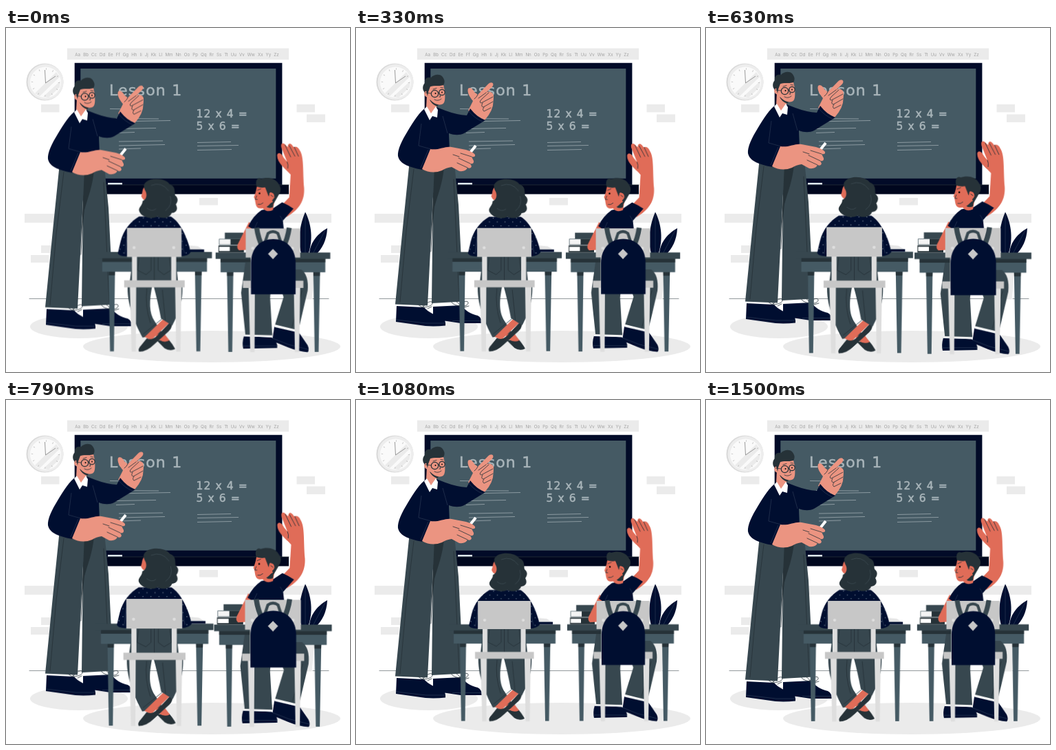
Recreate the animation shown at these times as an HTML page. Size 500x500 px, loop 1.54 s.

```html
<!DOCTYPE html>
<html lang="en">
<head>
<meta charset="utf-8">
<title>Classroom</title>
<style>
html, body { margin: 0; width: 100%; height: 100%; overflow: hidden; background: #fff; }
svg { display: block; width: 100vw; height: 100vh; }
text { font-family: "DejaVu Sans", sans-serif; fill: #a9b5ba; stroke: #a9b5ba; stroke-width: .5; }
.alphabet { font: 6.2px Inter, sans-serif; word-spacing: 2.3px; fill: #a3a3a3; stroke: none; }
.pale { fill: #ebebeb; }
.frame { fill: #020b28; }
.navy { fill: #000e30; }
.dark { fill: #263238; }
.cloth { fill: #37474f; }
.slate { fill: #455a64; }
.skin { fill: #eb9481; }
.tan { fill: #e06c58; }
.white { fill: #fff; }
.line { fill: none; stroke: #263238; stroke-width: .8; stroke-linecap: round; stroke-linejoin: round; }
.thin { stroke-width: .5; }
.bold { stroke-width: 1.2; }
.seam { fill: none; stroke: #33405c; stroke-width: .6; }
.chalk { fill: none; stroke: #93a1a7; stroke-width: .9; }

.teacher { animation: float 1540ms -42ms infinite linear; }
.pupil { animation: beat 1540ms -42ms infinite linear; }
#girl { transform-origin: 216px 345px; }
#boy { transform-origin: 388px 318.5px; }

@keyframes float {
  0%, 97.4%, 100% { transform: translateY(0); }
  48.7% { transform: translateY(-10px); }
}
@keyframes beat {
  0%, 29.2%, 39%, 60.9%, 100% { transform: scale(1); }
  9.74%, 48.7% { transform: scale(1.1); }
}
</style>
</head>
<body>
<svg viewBox="0 0 500 500">
  <defs>
    <pattern id="dots" width="11" height="11" patternUnits="userSpaceOnUse">
      <rect width="11" height="11" fill="#000e30"/>
      <circle cx="2" cy="3" r=".6" fill="#a9b5c0"/>
      <circle cx="7.500" cy="8.500" r=".6" fill="#a9b5c0"/>
    </pattern>
    <g id="desk">
      <path class="slate" d="M151 353h9l-1.500 113.500h-5.500zM273 353h9.500l-2 113.500h-5.500z"/>
      <path class="dark" d="M151 353h9l-.3 6h-8.600zM273 353h9.500l-.2 6h-9.200z"/>
      <path class="slate" d="M142 334h148v20H142z"/>
      <path class="dark" d="M142 334h148v6H142z"/>
      <path class="cloth" d="M135 326h162v9H135z"/>
    </g>
    <g id="chair">
      <path fill="#dedede" d="M184 332h7v36h-7zM239.500 332h7v36h-7zM181 375h9l-.5 92h-6zM245 375h9l-1.500 92h-6z"/>
      <path fill="#c7c7c7" d="M177 292h77v41h-77zM173 366h85.500v10H173z"/>
      <circle cx="187" cy="320" r="2.200" fill="#dedede"/>
      <circle cx="243" cy="320" r="2.200" fill="#dedede"/>
    </g>
  </defs>

  <!-- Wall and floor -->
  <g class="pale">
    <path d="M89 29.500h322V46H89zM51 111h26.500v11.500H51zM422.500 111H449v11.500h-26.500zM437 125.500h27V137h-27zM281 247h27v10.500h-27zM51 316h27v11H51zM36 330h26.500v11H36zM27 270h446v13H27z"/>
    <ellipse cx="106" cy="434" rx="71" ry="17"/>
    <ellipse cx="299" cy="463" rx="187" ry="23"/>
  </g>
  <path class="line thin" d="M34 393.500H469"/>
  <text class="alphabet" x="248.500" y="40.500" text-anchor="middle">Aa Bb Cc Dd Ee Ff Gg Hh Ii Jj Kk Ll Mm Nn Oo Pp Qq Rr Ss Tt Uu Vv Ww Xx Yy Zz</text>

  <!-- Clock -->
  <circle cx="56.500" cy="78.500" r="27" fill="#d9d9d9"/>
  <circle cx="57.500" cy="78.500" r="26" fill="#ededed"/>
  <circle cx="57.500" cy="79" r="22.500" fill="#fafafa"/>
  <path fill="#ebebeb" d="M42 95L73 64l5 7L49 99zM54 100L79 77l-1 9L62 101z"/>
  <circle cx="57.500" cy="79" r="19.500" fill="none" stroke="#bdbdbd" stroke-width="2.500" stroke-dasharray=".8 9.410"/>
  <path d="M57.500 80L56.500 61M57.500 80L72 70" fill="none" stroke="#999"/>

  <!-- Board -->
  <path class="frame" d="M99.700 50.700H401.400V230H99.700z"/>
  <path class="slate" d="M108.300 59H392.300V218.700H108.300z"/>
  <path fill="#00071e" d="M90 228H411v13.500H90z"/>
  <path class="line" d="M90 228H411"/>
  <path fill="#dfe9ee" d="M148 225h21v2.500h-21z"/>
  <text x="150" y="98" font-size="22" letter-spacing="1.200">Lesson 1</text>
  <g font-size="15.500" letter-spacing="1.100">
    <text x="276.500" y="129.500">12 x 4 =</text>
    <text x="276.500" y="147.500">5 x 6 =</text>
  </g>
  <path class="chalk" d="M151 117.500L192 118M160 131.500L222 132M160 136L239 134.500M160 146.500L218 145.500M160 152.500L187 151.500M164 165L228 164M164 171L231 169.500M164 176L196 175M278 166.500L327 165.500M278 171.500L338 170.500M278 177.500L328 176.500"/>

  <!-- Plant -->
  <path fill="#ebebeb" stroke="#fff" d="M425 350h24l-4 45h-16z"/>
  <path class="navy" d="M430 330C423 310 427 286 435 267.500C444 285 447 308 439 330zM441 330C441 314 451 300 467 291C466 309 460 320 450 330z"/>
  <path class="seam" d="M435 272V328M464 294L446 328"/>

  <g class="teacher">
    <!-- Shoes -->
    <path class="navy" d="M112 410L153 408C158 415 167 421 177 423Q183 426 183 434H152L112 428zM59 409L99 411C105 418 116 423 125 426Q131 430 130 437.500Q115 439 101 438L58 432z"/>
    <path class="seam" d="M58 429L102 434H130M140 430.500H182"/>
    <path class="line" d="M97 411C88 407 85 402 90 402S97 408 98 410C104 402 111 401 111 405S102 411 97 411zM150 409C141 407 136 403 141 402S150 406 151 408C156 401 164 401 163 405S155 410 150 409zM104 413L110 410M157 411L164 409"/>
    <!-- Trousers -->
    <path class="cloth" d="M77.500 202H143L149 262L156 402.500L110 405L112 250L104 408.500L57 406.500L68.500 290z"/>
    <path class="dark" d="M114 207H128C126 230 119 247 114 265L110 300z"/>
    <path class="line" d="M84 210L73 300L64 403M142 225L150 400M113 245L109 330"/>
    <!-- Neck and head -->
    <path class="skin" d="M103 102L118 106L117 124L108 130L102 121z"/>
    <path class="dark" d="M107 109L120 116L118 119Q110 116 107 109z"/>
    <path class="skin" d="M104 91L126 85C129 92 130 103 129 110Q128 117 121 116.500C114 116 108 111 106 105Q100 107 99 100Q100 95 104 97z"/>
    <path class="dark" d="M98 96C96 91 98 87 100 85C99 78 104 76 109 77C112 73 121 71 125 75Q131 82 127 88C120 90 112 88 108 90L105 98L104 104L102 96Q100 95 100 99z"/>
    <g class="line">
      <circle class="bold" cx="114.500" cy="100.500" r="5.200"/>
      <circle class="bold" cx="125" cy="98.500" r="4.200"/>
      <path d="M101 99L109 100M119.500 99.500L121 99M121 100L123 105H121M114 109Q119 112 124 108M112 94L117 92.500M123 91.500L127 92"/>
    </g>
    <circle cx="115.500" cy="100" r="1"/>
    <circle cx="125" cy="98.500" r=".9"/>
    <!-- Pointing hand -->
    <path class="skin" d="M163 125L170 111C165 105 161 98 163 93C166 90 170 94 172 98L177 102L192 86.500C197 81.500 202 85.500 198 90.500L189 99C195 95 201 100 200 105Q200 108 199.500 112Q200 124 187 139z"/>
    <path class="line" d="M177 102Q175 106 172 108M189 99L178 107M199 105L182 114Q178 113 183 108L193 99M199 112L185 120Q181 119 184 114M196 121L186 126Q183 124 186 120"/>
    <!-- Sweater -->
    <path class="navy" d="M103 119.500C92 127 84 140 75 155C67 168 60 182 61 191C63 201 74 207 97 211L106 192L136 184L135 158C143 161 151 161 157 158L188 139Q176 135 166 122L161 132Q146 131 130 125L117 120L107 135z"/>
    <path class="white" d="M103 119L99 123L107 139L111 133L118 135L119 124L116 119L109 129z"/>
    <path class="seam" d="M95 144L91 176L109 181M109 181L97 210M105 182L94 208M163 125Q173 137 184 141M126 133L133 158"/>
    <!-- Chalk hand -->
    <path d="M162 191L174 176" fill="none" stroke="#fff" stroke-width="4"/>
    <path class="skin" d="M108 181C120 183 130 176 139 178L160 182Q170 185 173 189Q174 193 168 192L171 198Q172 203 166 202L168 206Q167 210 162 208Q160 214 150 213L139 207Q131 208 125 212Q110 218 96 210z"/>
    <path class="line" d="M168 192L152 187M166 202L149 194M162 208L147 201M141 189L150 192"/>
  </g>

  <g id="girl" class="pupil">
    <use href="#desk"/>
    <path fill="#e6e6e6" d="M258 316L277 318L285 323L262 326z"/>
    <path class="navy" d="M258 322.500H286V326H258z"/>
    <!-- Crossed legs -->
    <path class="dark" d="M219 451L236 450Q242 457 245 463Q238 467 230 462z"/>
    <path class="tan" d="M214 440L230 442L237 451Q230 455 222 450z"/>
    <path class="cloth" d="M178 372H213C208 396 208 412 216 424L227 441L199 447C188 427 176 398 178 372z"/>
    <path class="tan" d="M230 419L238 425L211 451L202 446z"/>
    <path class="dark" d="M239 424Q243 431 236 438L215 457Q205 467 194 467Q192 463 197 458L205 448Q212 452 220 444z"/>
    <path class="cloth" d="M214 372H255C257 396 249 414 241 430L225 420Q221 398 214 372z"/>
    <path class="line" d="M205 378Q202 402 210 426M227 380L231 422M200 442L226 421"/>
    <!-- Back -->
    <path class="cloth" d="M186 328H245L249 367H181z"/>
    <path class="line" d="M215.500 332V366M194 334L192 352L204 358L211 352V334M221 334V352L229 358L239 352L237 334"/>
    <path fill="url(#dots)" d="M194 276C182 283 172 295 168 311L164 328Q167 333 178 332H252Q264 332 267 326C262 304 252 284 239 276z"/>
    <path class="seam" d="M177 304L174 329M253 304L258 328"/>
    <!-- Head -->
    <path class="tan" d="M205 232C197 236 200 241 197 247Q200 255 208 253L210 238z"/>
    <path class="dark" d="M204 227C212 220 232 222 237 230C246 233 244 241 245 246C250 250 249 255 246 259C250 266 246 271 240 271C237 279 226 279 220 276C211 281 198 276 195 270C191 264 199 261 199 254C206 251 205 243 203 240C200 234 200 230 204 227z"/>
    <path d="M211 232Q226 226 236 240M238 247Q242 260 231 268M205 264Q212 270 218 265" fill="none" stroke="#46545c" stroke-width=".6"/>
    <use href="#chair"/>
  </g>

  <g id="boy" class="pupil">
    <use href="#desk" x="172"/>
    <!-- Books -->
    <path class="cloth" d="M320 298h26v9h-26z"/>
    <path fill="#f4f4f4" stroke="#455a64" stroke-width=".7" d="M312 307h34v8h-34z"/>
    <path class="dark" d="M311 316h36v10h-36zM328 307h18v8h-18z"/>
    <path class="white" d="M312 318h15v6h-15z"/>
    <!-- Legs -->
    <path class="navy" d="M347 444L386 446Q395 451 394 461L346 462Q344 454 347 444zM390 430L424 438L437 457Q440 464 437 467Q424 466 409 460L387 451z"/>
    <path class="cloth" d="M349 340H388L384 390L387 443L349 442L343 383z"/>
    <path class="cloth" d="M390 350H428Q439 358 437 380L424 436L391 428L403 389z"/>
    <path class="line" d="M354 378L359 438M429 380L415 431"/>
    <path d="M347 444L387 445M390 430.500L424 438.500" fill="none" stroke="#fff" stroke-width="1.400"/>
    <path class="seam" d="M346 458H394M387 447L410 456L438 463"/>
    <!-- Arms and torso -->
    <path class="tan" d="M354 283L366 291L358 322L340 323Q335 319 340 311z"/>
    <path class="tan" d="M394 266L411 248L413 216C405 207 393 199 394 188C396 183 401 187 403 192L408 198L400 178C398 171 403 170 406 174.500L409 177C409 170 414 171 417 177Q423 175 426 182C432 191 430 211 432 235C433 254 424 266 407 276z"/>
    <path class="line" d="M405 174L413 191M411 175L419 190M418 177L424 190M408 198Q410 202 409 207"/>
    <path class="navy" d="M372 266L389 263L401 255Q410 259 417 264L402 281L407 326H358L361 294L353 289Q360 274 372 266z"/>
    <path class="seam" d="M402 281L398 274M361 294L366 283"/>
    <!-- Head -->
    <path class="tan" d="M375 252L391 249L388 266Q380 270 374 264z"/>
    <path class="dark" d="M377 260L389 254L388 262Q382 265 377 260z"/>
    <path class="tan" d="M366 229L388 235Q393 242 388 251C384 260 375 266 367 263C362 260 364 251 361 248Q363 243 364 239z"/>
    <path class="dark" d="M365 233C362 224 367 219 371 222C379 219 391 220 396 229Q402 236 396 245L389 257L386 250Q391 242 384 241L382 247L377 234Q371 235 365 233z"/>
    <path class="tan" d="M383 242Q390 240 390 248Q387 254 383 252z"/>
    <path class="line" d="M366 238L371 236M365 246L363 251H366M367 258Q371 259 374 256M385 245L388 247"/>
    <circle cx="369" cy="242.500" r="1.200"/>
    <use href="#chair" x="172.500"/>
    <!-- Backpack -->
    <g fill="none" stroke="#37474f">
      <path stroke-width="7" d="M365 291Q367 306 374 320M411 291Q409 306 402 320"/>
      <path stroke-width="4" d="M377 311L381 299Q388 294 395 299L399 311"/>
    </g>
    <path class="navy" d="M357 385V341C357 320 370 307 388.500 307S420 320 420 341V385z"/>
    <path fill="#c7c7c7" d="M388 321L395 328L388 335.500L381 328z"/>
  </g>
</svg>
</body>
</html>
```
